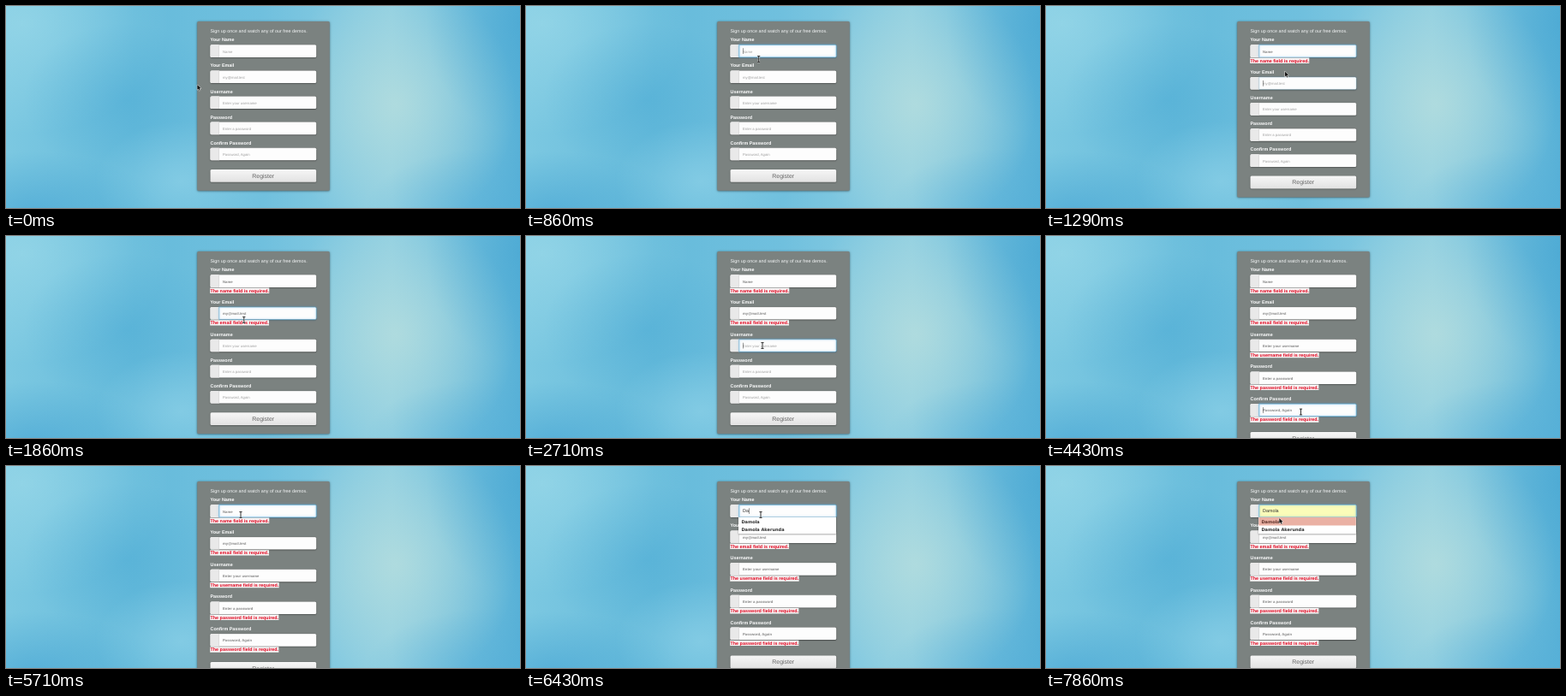
Animation of 600 by 236 pixels, one loop 8000 ms. Source, as an HTML page with a canvas:

```html
<!DOCTYPE html>
<html lang="en">
<head>
<meta charset="utf-8">
<title>Sign-up form</title>
<style>
html, body { margin: 0; width: 100%; height: 100%; overflow: hidden; background: #74c1de; }
canvas { display: block; width: 600px; height: 236px; }
</style>
</head>
<body>
<canvas id="stage"></canvas>
<script>
const W = 600, H = 236, LOOP = 8000, RATE = 7;
const canvas = document.getElementById('stage');
const ctx = canvas.getContext('2d');
const dpr = window.devicePixelRatio || 1;
canvas.width = W * dpr;
canvas.height = H * dpr;

const SANS = '"Liberation Sans", Arial, sans-serif';
const MENU = '"DejaVu Sans", sans-serif';
const ZOOM = 0.386;            // the form is a page shown at reduced size
const LEFT = 238.5, RIGHT = 362.2, INPUT = 248.8;
const FIELD_H = 14.6, PITCH = 30.1, ERROR_H = 7.6;

// error: [shown, hidden), focus: list of [start, end), all in steps of 1/7 s
const fields = [
  { label: 'Your Name', hint: 'Name', what: 'name', error: [9, 45], focus: [[4, 9], [36, 99]] },
  { label: 'Your Email', hint: 'my@mail.test', what: 'email', error: [13, 99], focus: [[9, 13]] },
  { label: 'Username', hint: 'Enter your username', what: 'username', error: [23, 99], focus: [[18, 23]] },
  { label: 'Password', hint: 'Enter a password', what: 'password', error: [28, 99], focus: [[23, 28]] },
  { label: 'Confirm Password', hint: 'Password, Again', what: 'password', error: [31, 99], focus: [[29, 34]] }
];
const names = ['Damola', 'Damola Akerunda'];
const TYPE_AT = 43, MENU_AT = 44, HOVER_AT = 53;

// pointer path: [step, x, y, is text beam]
const path = [
  [0, 223.3, 92, 0], [2, 244, 74, 0], [4, 266, 54, 1], [5, 268, 53, 1], [8, 279, 80, 1],
  [9, 278.8, 76.5, 0], [11, 278, 88, 1], [13, 277.8, 98, 1], [15, 277, 104, 0], [18, 276, 126, 1],
  [20, 276, 130, 1], [22, 274, 156, 1], [23, 273.6, 155.5, 0], [24, 274, 160, 1], [25, 275, 165, 1],
  [28, 295, 196, 1], [31, 297.5, 205.5, 1], [32, 297.5, 206, 1], [35, 280, 90, 0],
  [36, 275, 60, 1], [37, 274, 57, 1], [51, 274, 57, 1], [53, 274, 67, 0], [55, 272.3, 61, 0]
];

const clamp = v => Math.max(0, Math.min(1, v));
const within = (k, [a, b]) => k >= a && k < b;

function text(str, x, y, size, color, { bold = false, family = SANS, align = 'left' } = {}) {
  ctx.save();
  ctx.translate(x, y);
  ctx.scale(ZOOM, ZOOM);
  ctx.font = `${bold ? 'bold ' : ''}${size}px ${family}`;
  ctx.textAlign = align;
  ctx.fillStyle = color;
  ctx.fillText(str, 0, 0);
  const w = ctx.measureText(str).width * ZOOM;
  ctx.restore();
  return w;
}

function box(x0, y0, x1, y1, fill, radius = 0) {
  ctx.beginPath();
  ctx.roundRect(x0, y0, x1 - x0, y1 - y0, radius);
  ctx.fillStyle = fill;
  ctx.fill();
}

function shadowed(color, blur, dy, draw) {
  ctx.save();
  ctx.shadowColor = color;
  ctx.shadowBlur = blur * dpr;
  ctx.shadowOffsetY = dy * dpr;
  draw();
  ctx.restore();
}

function blend(x0, y0, x1, y1, stops) {
  const g = ctx.createLinearGradient(x0, y0, x1, y1);
  stops.forEach((c, i) => g.addColorStop(i / (stops.length - 1), c));
  return g;
}

function glow(x, y, rx, ry, rgb, alpha) {
  ctx.save();
  ctx.translate(x, y);
  ctx.scale(rx, ry);
  const g = ctx.createRadialGradient(0, 0, 0, 0, 0, 1);
  g.addColorStop(0, `rgba(${rgb},${alpha})`);
  g.addColorStop(0.5, `rgba(${rgb},${alpha * 0.5})`);
  g.addColorStop(1, `rgba(${rgb},0)`);
  ctx.fillStyle = g;
  ctx.fillRect(-1, -1, 2, 2);
  ctx.restore();
}

function backdrop() {
  box(0, 0, W, H, blend(0, 0, W, 0, ['#7cc8e1', '#66bbdb', '#70c0de', '#8fcfe2', '#58b1d7']));
  glow(20, 20, 170, 130, '160,220,234', 0.6);
  glow(140, 110, 120, 90, '72,168,211', 0.4);
  glow(30, 240, 150, 70, '66,162,210', 0.6);
  glow(205, 205, 100, 70, '150,214,234', 0.55);
  glow(455, 115, 140, 150, '180,221,222', 0.85);
  glow(600, 20, 110, 130, '66,163,209', 0.4);
  glow(570, 236, 150, 70, '84,174,216', 0.5);
}

function focusLevel(field, k) {
  return Math.max(...field.focus.map(([a, b]) =>
    k < a ? 0 : k < b ? clamp((k - a + 0.5) / 2) : clamp(1 - (k - b + 0.5) / 2)));
}

function drawInput(field, y, k, typed, preview) {
  const bottom = y + FIELD_H;
  shadowed('rgba(0,0,0,.5)', 1.5, 0.6, () => box(LEFT, y, RIGHT, bottom, '#fdfdfd', 1.5));
  box(LEFT, y, INPUT, bottom, '#e9e9e9', [1.5, 0, 0, 1.5]);
  box(INPUT - 0.4, y, INPUT, bottom, '#c4c4c4');
  if (preview) box(INPUT, y, RIGHT, bottom, '#fbfcb9', [0, 1.5, 1.5, 0]);
  box(INPUT, y, RIGHT, y + 0.5, 'rgba(0,0,0,.14)');

  const level = focusLevel(field, k);
  if (level) {
    ctx.save();
    ctx.globalAlpha = level;
    ctx.strokeStyle = '#5cb2dc';
    ctx.lineWidth = 0.7;
    ctx.beginPath();
    ctx.roundRect(INPUT, y, RIGHT - INPUT, FIELD_H, [0, 1.5, 1.5, 0]);
    shadowed('rgba(82,168,236,.8)', 2.5, 0, () => ctx.stroke());
    ctx.restore();
  }

  const bold = within(k, field.error);
  let caretX = 253.2;
  if (typed) caretX += text(typed, 253, y + 8.9, 14, '#333') + 0.3;
  else text(field.hint, 253, y + 9.2, 11, bold ? '#858585' : '#a0a0a0', { bold });

  const now = field.focus.find(f => within(k, f));
  if (now && !preview && (typed || (k - now[0]) % 7 < 4)) {
    box(caretX, y + 4, caretX + 0.5, y + 10.8, '#333');
  }
}

function drawError(field, y) {
  const msg = `The ${field.what} field is required.`;
  ctx.font = `bold 14px ${SANS}`;
  const w = ctx.measureText(msg).width * ZOOM;
  box(LEFT - 0.3, y + 15.2, LEFT + w + 0.3, y + 21.6, '#f8f5f5');
  text(msg, LEFT, y + 20.2, 14, '#e0041e', { bold: true });
}

function drawMenu(hover) {
  shadowed('rgba(0,0,0,.4)', 1.5, 0.5, () => box(248, 59.8, 362, 79.2, '#fff'));
  if (hover) box(248.3, 60, 361.8, 69.4, '#eab1a4');
  names.forEach((name, i) =>
    text(name, 251.4, 66.6 + i * 9.3, 13, hover && !i ? '#5d3129' : '#2c2c2c', { bold: true, family: MENU }));
}

function pointerAt(k) {
  let i = path.length - 1;
  while (path[i][0] > k) i--;
  const a = path[i], b = path[i + 1] || a;
  const u = a === b ? 0 : (k - a[0]) / (b[0] - a[0]);
  return [a[1] + (b[1] - a[1]) * u, a[2] + (b[2] - a[2]) * u, a[3]];
}

function drawPointer(k) {
  const [x, y, beam] = pointerAt(k);
  ctx.save();
  ctx.translate(x, y);
  ctx.lineJoin = 'round';
  ctx.beginPath();
  if (beam) {
    for (const s of [-1, 1]) {
      ctx.moveTo(-1.6, s * 3.4);
      ctx.lineTo(1.6, s * 3.4);
    }
    ctx.moveTo(0, -3.4);
    ctx.lineTo(0, 3.4);
    ctx.strokeStyle = 'rgba(255,255,255,.7)';
    ctx.lineWidth = 1.7;
    ctx.stroke();
    ctx.strokeStyle = '#1c1c1c';
    ctx.lineWidth = 0.9;
    ctx.stroke();
  } else {
    [[0, 0], [0, 6], [1.4, 4.8], [2.4, 7], [3.4, 6.5], [2.4, 4.4], [4.3, 4.3]]
      .forEach(p => ctx.lineTo(...p));
    ctx.closePath();
    ctx.strokeStyle = '#fff';
    ctx.lineWidth = 1;
    ctx.stroke();
    ctx.fillStyle = '#151515';
    ctx.fill();
  }
  ctx.restore();
}

function draw(k) {
  ctx.setTransform(dpr, 0, 0, dpr, 0, 0);
  ctx.textRendering = 'geometricPrecision';
  backdrop();

  const grow = fields.filter(f => within(k, f.error)).length * ERROR_H;
  shadowed('rgba(0,0,0,.55)', 2.5, 0.4, () => box(223.2, 18, 377.8, 215.8 + grow, '#7b8280', 1.5));
  text('Sign up once and watch any of our free demos.', LEFT, 30.5, 14, '#f4f6f6');

  const hover = k >= HOVER_AT;
  const typed = hover ? names[0] : k >= TYPE_AT ? names[0].slice(0, k < 45 ? 1 : 2) : '';
  let y = 45.3;
  fields.forEach((field, i) => {
    text(field.label, LEFT, y - 4, 14, '#fff', { bold: true });
    drawInput(field, y, k, i ? '' : typed, !i && hover);
    if (within(k, field.error)) {
      drawError(field, y);
      y += ERROR_H;
    }
    y += PITCH;
  });

  const top = 191 + grow;
  shadowed('rgba(0,0,0,.5)', 1.5, 0.5, () =>
    box(LEFT, top, RIGHT, top + 14.8, blend(0, top, 0, top + 14.8, ['#f6f6f6', '#e2e2e2']), 1.5));
  text('Register', 300.2, top + 9.7, 18, '#666', { align: 'center' });

  if (k >= MENU_AT) drawMenu(hover);
  drawPointer(k);
}

let last = -1;
function tick() {
  const k = Math.floor(((performance.now() % LOOP) + 5) * RATE / 1000) % (LOOP * RATE / 1000);
  if (k !== last) draw(last = k);
  requestAnimationFrame(tick);
}
tick();
</script>
</body>
</html>
```
